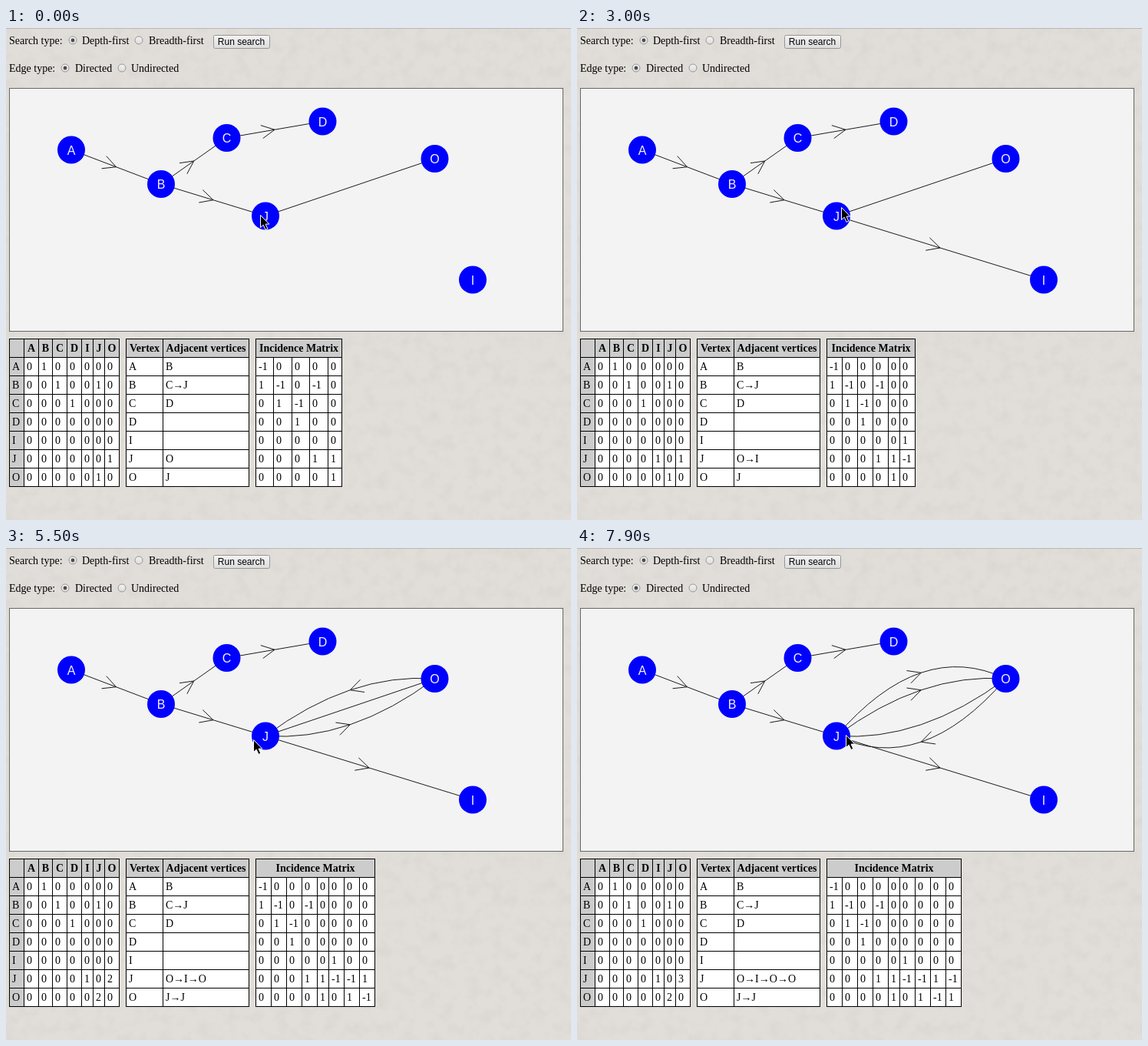
Recreate the animation shown at these times as an HTML page. Size 736 by 640 pixels, loop 8 s.

```html
<!DOCTYPE html>
<html lang="en">
<head>
<meta charset="utf-8">
<title>Graph editor</title>
<style>
  html, body { margin: 0; width: 100%; height: 100%; overflow: hidden; background: #e1ded9; }
  svg { position: absolute; left: 0; top: 0; display: block; }
  text { font: 14px "Liberation Serif", "Times New Roman", serif; fill: #000; }
  .bold { font-weight: bold; text-anchor: middle; }
  .sans { font: 12px "Liberation Sans", Arial, sans-serif; text-anchor: middle; }
  .node { font: 16px "Liberation Sans", Arial, sans-serif; text-anchor: middle; fill: #f4f4ff; }
  .edge { fill: none; stroke: #1c1c1c; stroke-width: 1; }
  .crisp { shape-rendering: crispEdges; }
</style>
</head>
<body>
<svg width="736" height="640">
  <defs>
    <filter id="paper" x="0" y="0" width="100%" height="100%" color-interpolation-filters="sRGB">
      <feTurbulence type="fractalNoise" baseFrequency=".06" numOctaves="3" seed="8"/>
      <feColorMatrix values="0 0 0 0 .45  0 0 0 0 .42  0 0 0 0 .38  .12 0 0 0 -.05"/>
    </filter>
    <linearGradient id="face" x2="0" y2="1">
      <stop stop-color="#f4f4f4"/><stop offset="1" stop-color="#dcdcdc"/>
    </linearGradient>
  </defs>
  <rect width="736" height="640" filter="url(#paper)"/>
  <rect width="736" height="1" fill="#b9b7b4"/>
  <text x="4" y="21">Search type:</text>
  <text x="99" y="21">Depth-first</text>
  <text x="186" y="21">Breadth-first</text>
  <text x="4" y="57">Edge type:</text>
  <text x="90" y="57">Directed</text>
  <text x="163" y="57">Undirected</text>
  <g fill="url(#face)" stroke="#969696">
    <circle cx="87" cy="16" r="5"/><circle cx="173" cy="16" r="5"/>
    <circle cx="77" cy="52" r="5"/><circle cx="151" cy="52" r="5"/>
    <rect x="270.5" y="9.5" width="73" height="17" rx="2"/>
  </g>
  <g fill="#4c4c4c"><circle cx="87" cy="16" r="2.4"/><circle cx="77" cy="52" r="2.4"/></g>
  <text class="sans" x="306.5" y="22">Run search</text>
  <rect x="4.5" y="78.5" width="721" height="316" fill="#f3f3f3" stroke="#666"/>
</svg>
<svg id="tables" width="736" height="640"></svg>
<svg id="graph" width="736" height="640"></svg>
<svg width="736" height="640">
  <path id="cursor" d="M.5 .5V16.5L4.2 13.2 7 19.4 9.8 18.2 7.1 12.1H11.8Z" fill="#000" stroke="#fff"/>
</svg>
<script>
const LOOP = 8000, STEP = 100, LAG = 65, BEND = 45;
const $ = id => document.getElementById(id);

const nodes = {
  A: [85, 158.5], B: [202, 203], C: [287.5, 143], D: [412.5, 121.5],
  I: [608, 327.5], J: [338, 244.5], O: [558.5, 170]
};
const names = Object.keys(nodes);

// an edge is dragged out from `start` and joins the graph at `end`
const edge = (pair, start = 0, end = 0) => ({ from: pair[0], to: pair[1], start, end });
const edges = [
  ...['AB', 'BC', 'CD', 'BJ'].map(p => edge(p)),
  { ...edge('JO'), both: true },
  edge('JI', 300, 2200), edge('JO', 3300, 4200), edge('OJ', 4500, 5400), edge('JO', 5900, 6900)
];

// pointer moves: start, end, x, y
const moves = [
  [200, 300, 398, 271], [400, 1200, 547, 300], [1300, 2000, 604, 325],
  [2400, 2800, 344, 233], [3200, 3700, 553, 169], [3700, 4100, 556, 168],
  [4400, 5300, 322, 249], [5500, 5700, 329, 249], [5800, 6600, 565, 161],
  [6900, 7500, 353, 243], [7800, 7900, 350, 243]
];

function pointerAt(t) {
  let x = 331, y = 243;
  for (const [start, end, toX, toY] of moves) {
    const k = Math.min(1, Math.max(0, (t - start) / (end - start)));
    const eased = 1 - (1 - k) ** 1.55;
    x += (toX - x) * eased;
    y += (toY - y) * eased;
  }
  return [x, y];
}

function arrow(x, y, [x0, y0], [x1, y1]) {
  const back = Math.atan2(y0 - y1, x0 - x1);
  const wing = a => `${x + 19 * Math.cos(back + a)} ${y + 19 * Math.sin(back + a)}`;
  return `M${wing(.47)}L${x} ${y}L${wing(-.47)}`;
}

const stroke = d => `<path class="edge" d="${d}"/>`;
const ends = e => [e.from, e.to].sort().join();

// parallel edges fan out by a growing bend, alternating sides
function edgePath(e, live) {
  const a = nodes[e.from], b = nodes[e.to];
  const twins = live.filter(o => ends(o) === ends(e));
  const n = twins.length, i = twins.indexOf(e);
  const rank = n % 2 ? Math.ceil(i / 2) : Math.floor(i / 2) + 1;
  const bend = rank * BEND * ((i + n) % 2 ? -1 : 1);
  const mx = (a[0] + b[0]) / 2, my = (a[1] + b[1]) / 2;
  return stroke(`M${a}Q${mx} ${my + bend} ${b}` + (e.both ? '' : arrow(mx, my + bend / 2, a, b)));
}

function dragPath(t) {
  const e = edges.find(e => t >= e.start && t < e.end);
  if (!e) return '';
  const a = nodes[e.from], b = pointerAt(t - LAG);
  const third = k => a[k] + (b[k] - a[k]) / 3;
  return stroke(`M${a}L${b}` + arrow(third(0), third(1), a, b));
}

function drawGraph(t, live) {
  const discs = names.map(v => {
    const [x, y] = nodes[v];
    return `<circle cx="${x}" cy="${y}" r="18" fill="#00f"/>` +
      `<text class="node" x="${x}" y="${y + 6}">${v}</text>`;
  });
  $('graph').innerHTML = live.map(e => edgePath(e, live)).join('') + discs.join('') + dragPath(t);
}

const TOP = 404, ROW = 24;
const rect = (x, y, w, h, fill) =>
  `<rect class="crisp" x="${x}" y="${y}" width="${w}" height="${h}" fill="${fill}"/>`;

// one title per column, or a single title over all of them
function table(left, widths, heads, rows, labelled) {
  const xs = [left];
  let sum = left;
  for (const w of widths) xs.push(Math.floor(sum += w));
  const right = xs[xs.length - 1], h = ROW * (rows.length + 1);
  const wide = heads.length === 1;
  let s = rect(left, TOP, right - left, h, '#fff') + rect(left, TOP, right - left, ROW, '#ccc');
  if (labelled) s += rect(left, TOP, widths[0], h, '#ccc');
  for (let r = 0; r <= rows.length + 1; r++) s += rect(left, TOP + r * ROW, right - left + 1, 1, '#000');
  for (const x of xs) {
    const y = wide && x > left && x < right ? TOP + ROW : TOP;
    s += rect(x, y, 1, TOP + h - y, '#000');
  }
  heads.forEach((v, i) => {
    const end = wide ? right : xs[i + 1];
    s += `<text class="bold" x="${(xs[i] + end + 1) / 2}" y="${TOP + 17}">${v}</text>`;
  });
  rows.forEach((row, r) => row.forEach((v, c) => {
    s += `<text x="${xs[c] + 4}" y="${TOP + 41 + r * ROW}">${v}</text>`;
  }));
  return s;
}

function drawTables(live) {
  const targets = v => live.flatMap(e =>
    e.from === v ? [e.to] : e.both && e.to === v ? [e.from] : []);
  const sign = (e, v) => v === e.to ? 1 : v === e.from ? (e.both ? 1 : -1) : 0;
  const count = (v, w) => targets(v).filter(x => x === w).length;

  const letterWidth = v => 'IJ'.includes(v) ? 15 : v === 'B' ? 18 : 19;
  const natural = live.map(e => e.both ? 15 : 20);
  const stretch = Math.max(1, 112.1 / natural.reduce((a, b) => a + b));

  $('tables').innerHTML =
    table(4, [19, ...names.map(letterWidth)], ['', ...names],
      names.map(v => [v, ...names.map(w => count(v, w))]), true) +
    table(156, [48, 112], ['Vertex', 'Adjacent vertices'],
      names.map(v => [v, targets(v).join('→')])) +
    table(325, natural.map(w => w * stretch), ['Incidence Matrix'],
      names.map(v => live.map(e => sign(e, v))));
}

let lastTick = -1, lastCount = 0;
function frame() {
  const t = Math.floor(performance.now() % LOOP / STEP) * STEP;
  if (t !== lastTick) {
    lastTick = t;
    const live = edges.filter(e => e.end <= t);
    drawGraph(t, live);
    if (live.length !== lastCount) drawTables(live);
    lastCount = live.length;
    const [x, y] = pointerAt(t).map(Math.round);
    $('cursor').setAttribute('transform', `translate(${x} ${y})`);
  }
  requestAnimationFrame(frame);
}
frame();
</script>
</body>
</html>
```
